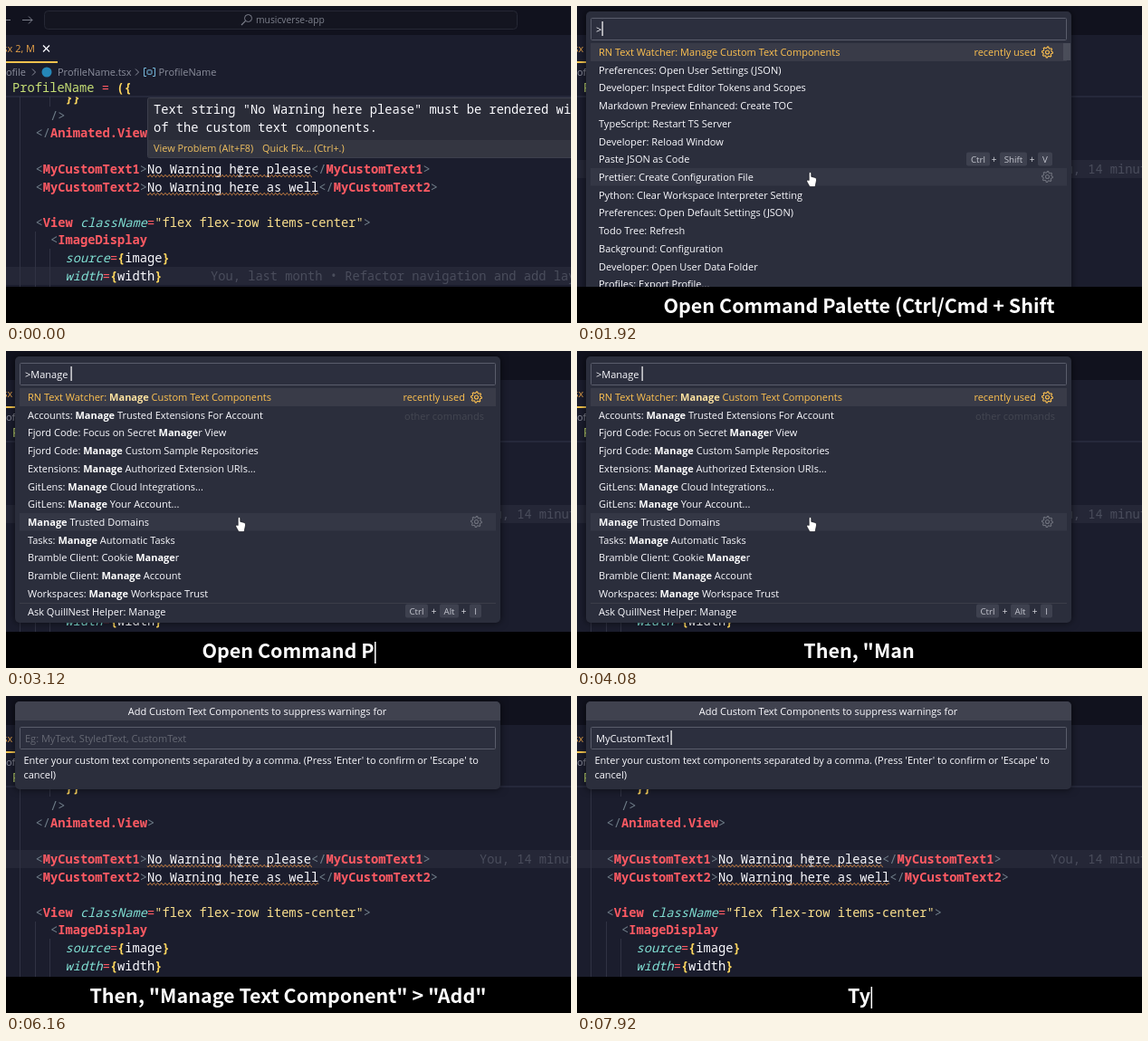
An HTML page with a canvas for the animation above (8 s loop, 624 px wide and 350 px high).

```html
<!DOCTYPE html>
<html lang="en">
<head>
<meta charset="utf-8">
<title>Command palette demo</title>
<style>
html, body { margin: 0; width: 100%; height: 100%; overflow: hidden; background: #000; }
canvas { display: block; width: 624px; height: 350px; }
</style>
</head>
<body>
<canvas id="stage" width="624" height="350"></canvas>
<script>
const ctx = document.getElementById('stage').getContext('2d');
const LOOP = 8000;
const MONO = '13.72px "Noto Sans Mono", "DejaVu Sans Mono", monospace';
const ui = (size = 11, weight = '') => `${weight} ${size}px "Open Sans", "Noto Sans", sans-serif`;
const CAPTION = 'bold 21.5px "Noto Sans CJK JP", "Noto Sans CJK SC", "Noto Sans", sans-serif';

const C = {
  editor: '#1b1d2d', bar: '#11121e', line: '#252737', guide: '#303243',
  tag: '#ff5a63', punct: '#6f7d88', attr: '#80dfd3', string: '#fbe08d', brace: '#ffd75e',
  white: '#fbfbff', dim: '#4a4d5c', crumb: '#8b8e9c', amber: '#ffc250',
  panel: '#2b2e3c', row: '#393b48', hover: '#343745', chip: '#3e414f', field: '#2c2f3e', edge: '#5a5d6b'
};

const COMMANDS = [
  'RN Text Watcher: Manage Custom Text Components',
  'Preferences: Open User Settings (JSON)',
  'Developer: Inspect Editor Tokens and Scopes',
  'Markdown Preview Enhanced: Create TOC',
  'TypeScript: Restart TS Server',
  'Developer: Reload Window',
  'Paste JSON as Code',
  'Prettier: Create Configuration File',
  'Python: Clear Workspace Interpreter Setting',
  'Preferences: Open Default Settings (JSON)',
  'Todo Tree: Refresh',
  'Background: Configuration',
  'Developer: Open User Data Folder',
  'Profiles: Export Profile...'
];
const MATCHES = [
  'RN Text Watcher: Manage Custom Text Components',
  'Accounts: Manage Trusted Extensions For Account',
  'Fjord Code: Focus on Secret Manager View',
  'Fjord Code: Manage Custom Sample Repositories',
  'Extensions: Manage Authorized Extension URIs...',
  'GitLens: Manage Cloud Integrations...',
  'GitLens: Manage Your Account...',
  'Manage Trusted Domains',
  'Tasks: Manage Automatic Tasks',
  'Bramble Client: Cookie Manager',
  'Bramble Client: Manage Account',
  'Workspaces: Manage Workspace Trust'
];

// start, end of the deletion, text
const CAPTIONS = [
  [10, 3540, 'Open Command Palette (Ctrl/Cmd + Shift + P)'],
  [3550, 7770, 'Then, "Manage Text Component" > "Add"'],
  [7800, 12000, 'Type the component names']
];

const clamp = (v, lo, hi) => Math.max(lo, Math.min(hi, v));
const typed = (text, t, start, step) => text.slice(0, clamp(Math.floor((t - start) / step) + 1, 0, text.length));

function rect(x, y, w, h, color) {
  ctx.fillStyle = color;
  ctx.fillRect(x, y, w, h);
}

function box(x, y, w, h, r, fill, stroke) {
  ctx.beginPath();
  ctx.roundRect(x, y, w, h, r);
  if (fill) { ctx.fillStyle = fill; ctx.fill(); }
  if (stroke) { ctx.strokeStyle = stroke; ctx.lineWidth = 1; ctx.stroke(); }
}

function stroke(points, color, width = 1) {
  ctx.beginPath();
  points.forEach(([x, y], i) => i ? ctx.lineTo(x, y) : ctx.moveTo(x, y));
  ctx.strokeStyle = color;
  ctx.lineWidth = width;
  ctx.stroke();
}

// Draws text and returns the x where it ends.
function text(str, x, y, color, font = ui(), align = 'left') {
  ctx.font = font;
  ctx.fillStyle = color;
  ctx.textAlign = align;
  ctx.fillText(str, x, y);
  return x + ctx.measureText(str).width;
}

// Runs are [text, color, style] triples on one line of code.
function code(x, cy, ...runs) {
  for (const [str, color, style = ''] of runs) x = text(str, x, cy + 4.9, color, `${style} ${MONO}`);
  return x;
}

function squiggle(x, end, y) {
  ctx.beginPath();
  for (let px = x; px <= end; px += 0.5) ctx.lineTo(px, y + 1.2 * Math.sin((px - x) * Math.PI / 2.1));
  ctx.strokeStyle = '#d98a45';
  ctx.lineWidth = 1;
  ctx.stroke();
}

function customText(cy, name, body, end) {
  code(32.5, cy, ['<', C.punct], [name, C.tag, 'bold'], ['>', C.punct], [body, C.white, '500'],
    ['</', C.punct], [name, C.tag, 'bold'], ['>', C.punct]);
  squiggle(156, end, cy + 7.6);
}

function attribute(cy, name, value) {
  code(65.5, cy, [name, C.attr, 'italic'], ['=', C.tag], ['{', C.brace, 'bold'],
    [value, C.white, '500'], ['}', C.brace, 'bold']);
}

function titleBar(active) {
  rect(0, 0, 624, 32, C.bar);
  if (!active) return;
  const grey = '#7d808c';
  stroke([[-4, 15.5], [5, 15.5]], grey);
  stroke([[18, 15.5], [29, 15.5]], grey);
  stroke([[25, 11.5], [29, 15.5], [25, 19.5]], grey);
  box(42.5, 5.5, 522, 20, 4, '#141520', '#262835');
  ctx.beginPath();
  ctx.arc(267.5, 13.5, 4, 0, 7);
  ctx.strokeStyle = grey;
  ctx.stroke();
  stroke([[264.6, 16.4], [260, 21]], grey, 1.2);
  text('musicverse-app', 276, 19, grey, ui(10.3));
}

function header() {
  rect(0, 32, 624, 68, C.editor);
  text('sx 2, M', 32, 51, '#e6a148', ui(), 'right');
  stroke([[41, 43.5], [48, 50.5]], C.white, 1.2);
  stroke([[48, 43.5], [41, 50.5]], C.white, 1.2);
  rect(0, 61, 57, 2, '#f0c14d');

  text('ofile', 22, 77, C.crumb, ui(), 'right');
  for (const x of [29, 143]) stroke([[x, 69.5], [x + 3.5, 73], [x, 76.5]], C.crumb);
  ctx.beginPath();
  ctx.arc(45, 73, 5.5, 0, 7);
  ctx.fillStyle = '#2587b8';
  ctx.fill();
  text('ProfileName.tsx', 57, 77, C.crumb);
  const blue = '#77b8dc';
  stroke([[155, 68.5], [152.5, 68.5], [152.5, 77.5], [155, 77.5]], blue);
  stroke([[162, 68.5], [164.5, 68.5], [164.5, 77.5], [162, 77.5]], blue);
  box(156, 70.8, 5, 4.5, 1, null, blue);
  text('ProfileName', 168.5, 77, C.crumb);

  code(7, 90, ['ProfileName', '#c6df75'], [' = ', C.tag], ['({', C.brace, 'bold']);
  rect(0, 99.5, 624, 1, '#33364a');
}

function editor(clicked, active) {
  rect(0, 0, 624, 350, C.editor);
  rect(0, clicked ? 170 : 288, 624, 20, C.line);
  rect(15, 100, 1, 210, C.guide);
  rect(32, 249, 1, 61, C.guide);
  rect(48, 268, 1, 42, C.guide);
  rect(48, 100, 1, 11, C.guide);

  code(65.5, 101.5, ['}}', C.brace, 'bold']);
  code(49, 121, ['/>', C.punct]);
  code(32.5, 140.5, ['</', C.punct], ['Animated.View', C.tag, 'bold'], ['>', C.punct]);
  customText(180, 'MyCustomText1', 'No Warning here please', 338);
  customText(200, 'MyCustomText2', 'No Warning here as well', 345);
  code(32.5, 239, ['<', C.punct], ['View', C.tag, 'bold'], [' className', C.attr, 'italic'], ['=', C.tag],
    ['"flex flex-row items-center"', C.string, '500'], ['>', C.punct]);
  code(49, 258.5, ['<', C.punct], ['ImageDisplay', C.tag, 'bold']);
  attribute(278, 'source', 'image');
  attribute(298, 'width', 'width');
  if (clicked) code(523, 180, ['You, 14 minutes ago', C.dim]);
  else code(226, 298, ['You, last month • Refactor navigation and add layout', C.dim]);

  titleBar(active);
  header();
}

function warning() {
  box(156.5, 101.5, 480, 66, 2, '#2a2c38', '#3d3f4d');
  rect(157, 148, 467, 19, '#343641');
  code(163, 114, ['Text string "No Warning here please" must be rendered within one', C.white, '500']);
  code(163, 134, ['of the custom text components.', C.white, '500']);
  text('View Problem (Alt+F8)', 163, 161, '#f0c060', ui(10.9));
  text('Quick Fix... (Ctrl+.)', 283, 161, '#f0c060', ui(10.9));
}

function panel(height) {
  ctx.save();
  ctx.shadowColor = 'rgba(0,0,0,.6)';
  ctx.shadowBlur = 8;
  box(10, 6, 536, height, 5, C.panel);
  ctx.restore();
}

function field(y, value, placeholder, caret) {
  box(15.5, y + 0.5, 525, 24, 1, C.field, C.edge);
  const base = y + 17;
  if (placeholder && !value) text(placeholder, 21, base, '#656873');
  const end = text(value, 21, base, C.white);
  if (caret) rect(Math.round(end) + 0.5, y + 4, 1.2, 16, '#fff');
}

function gear(x, y, color) {
  ctx.strokeStyle = color;
  ctx.lineWidth = 1.1;
  ctx.beginPath();
  for (let i = 0; i <= 32; i++) {
    const a = i * Math.PI / 16, r = i % 4 < 2 ? 6 : 4.6;
    ctx.lineTo(x + r * Math.cos(a), y + r * Math.sin(a));
  }
  ctx.stroke();
  ctx.beginPath();
  ctx.arc(x, y, 2, 0, 7);
  ctx.stroke();
}

// Keys are [label, x, width] triples.
function keys(cy, ...list) {
  list.forEach(([label, x, w], i) => {
    box(x, cy - 7.5, w, 15, 2, C.chip);
    text(label, x + w / 2, cy + 3.5, '#c3c5ce', ui(9.8), 'center');
    if (i) text('+', x - 6.5, cy + 4, '#d8d9e0', ui(10), 'center');
  });
}

const rowY = i => 51 + i * 19.72;

function label(str, bold, y, color, strong) {
  const at = bold ? str.indexOf(bold) : -1;
  if (at < 0) return text(str, 24, y, color);
  let x = text(str.slice(0, at), 24, y, color);
  x = text(bold, x, y, strong, ui(11, 'bold'));
  text(str.slice(at + bold.length), x, y, color);
}

function palette(query, caret) {
  const filtered = query.length > 1;
  const rows = filtered ? MATCHES : COMMANDS;
  panel(filtered ? 294 : 330);
  field(13, '>' + query, '', caret);
  rect(15, 41, 526, 20, C.row);
  rect(15, 179, 526, 19.5, C.hover);
  rows.forEach((str, i) =>
    label(str, query.trim(), rowY(i) + 4, i ? C.white : C.amber, i ? '#fff' : '#ffe3a0'));
  text('recently used', 507, 55, C.amber, ui(), 'right');
  gear(519.5, 51, C.amber);
  gear(519.5, 188.5, '#6e717c');
  if (filtered) {
    text('other commands', 528, 76, '#444752', ui(), 'right');
    rect(15, 278, 526, 1, '#3b3d49');
    text('Ask QuillNest Helper: ' + query.trim(), 24, rowY(12) + 4, C.white);
    keys(287, ['Ctrl', 441, 25], ['Alt', 479, 21], ['I', 512, 13]);
  } else {
    rect(537, 41, 8, 19, '#4a4d59');
    keys(169, ['Ctrl', 430, 26], ['Shift', 467, 30], ['V', 509, 16]);
  }
}

function actionPicker() {
  panel(78);
  field(13, '', 'Select an action, Add or Remove Components.');
  rect(15, 41, 526, 20, C.row);
  text('Add', 24, 55, C.amber);
  text('Remove', 24, 75, C.white);
}

function nameInput(value, caret) {
  panel(97);
  box(10, 6, 536, 21, [5, 5, 0, 0], '#40424f');
  text('Add Custom Text Components to suppress warnings for', 277.5, 21, C.white, ui(), 'center');
  field(34, value, 'Eg: MyText, StyledText, CustomText', caret);
  text("Enter your custom text components separated by a comma. (Press 'Enter' to confirm or 'Escape' to", 19.5, 75, C.white);
  text('cancel)', 19.5, 91, C.white);
}

function ibeam(x, y) {
  const grey = '#c9cad2';
  stroke([[x - 2.5, y - 5.5], [x + 2.5, y - 5.5]], grey);
  stroke([[x, y - 5], [x, y + 5]], grey);
  stroke([[x - 2.5, y + 5.5], [x + 2.5, y + 5.5]], grey);
}

function hand(x, y) {
  ctx.save();
  ctx.translate(x, y);
  ctx.beginPath();
  ctx.moveTo(-2.8, 1.6);
  ctx.lineTo(-2.8, -6.4);
  ctx.quadraticCurveTo(-1.5, -8.6, -0.2, -6.4);
  ctx.lineTo(-0.2, -2.6);
  ctx.lineTo(4, -1.6);
  ctx.quadraticCurveTo(5.8, -0.8, 5.6, 1);
  ctx.lineTo(4.8, 5);
  ctx.lineTo(4, 8.6);
  ctx.lineTo(-2, 8.6);
  ctx.lineTo(-5.2, 2.8);
  ctx.quadraticCurveTo(-5.2, 0.2, -2.8, 1.6);
  ctx.closePath();
  ctx.fillStyle = '#fff';
  ctx.fill();
  ctx.strokeStyle = '#15161f';
  ctx.lineWidth = 0.7;
  ctx.stroke();
  ctx.restore();
}

function caption(t) {
  rect(0, 310, 624, 40, '#000');
  const now = CAPTIONS.find(([start, end]) => t >= start && t < end);
  if (!now) return;
  const [start, end, full] = now;
  const count = Math.min(Math.floor((t - start) / 50), Math.ceil((end - t) / 30), full.length);
  const str = full.slice(0, count);
  text(str, 311.5, 339, '#fff', CAPTION, 'center');
  const half = ctx.measureText(str).width / 2;
  if ((t - start) % 1000 < 500) rect(311.5 + half + 0.5, 321, 1.5, 24, '#fff');
}

const blink = (t, since) => (t - since) % 1000 < 500;

function draw(t) {
  editor(t >= 480, t < 1680);
  if (t < 480) warning();
  if (t >= 1680 && t < 4240) {
    const query = typed('Manage ', t, 2320, 110);
    palette(query, blink(t, t < 2320 ? 1680 : Math.min(t, 2980)));
  } else if (t >= 4560 && t < 5600) {
    actionPicker();
  } else if (t >= 5600) {
    const value = typed('MyCustomText1', t, 6560, 100);
    nameInput(value, blink(t, t < 6560 ? 5600 : Math.min(t, 7760)));
  }
  if (t >= 1040 && t < 4240) hand(259, 191);
  else ibeam(258.5, 182.5);
  caption(t);
}

const began = performance.now();
function tick() {
  draw((performance.now() - began) % LOOP);
  requestAnimationFrame(tick);
}
tick();
</script>
</body>
</html>
```
